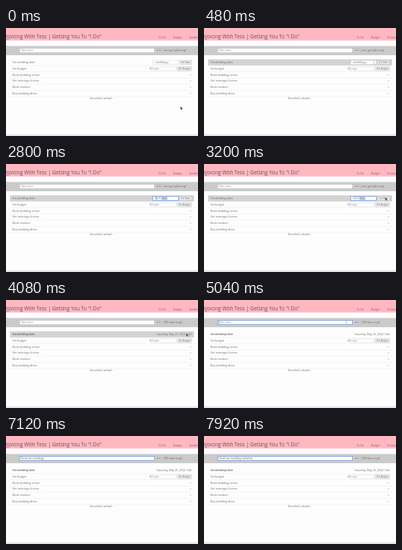
An HTML page for the animation above (8 s loop, 240 by 135 pixels).

```html
<!DOCTYPE html>
<html lang="en">
<head>
<meta charset="utf-8">
<title>Wedding planner</title>
<style>
html, body { margin: 0; width: 100%; height: 100%; overflow: hidden; background: #fff; }
svg { display: block; width: 100vw; height: 100vh; }
text { font: 3.5px "Open Sans", "Noto Sans", sans-serif; fill: #737373; white-space: pre; }
.title { font-size: 6.4px; fill: #6b5559; }
.nav { font-size: 3.3px; fill: #7d6368; }
.field { fill: #fdfdfd; stroke: #bdbdbd; stroke-width: .25; }
.field.on { stroke: #7d9fdc; stroke-width: .7; }
.button { fill: #ececec; stroke: #a8a8a8; stroke-width: .3; }
.bar .button { fill: #d6d6d6; }
.small { font-size: 2.9px; }
.medium { font-size: 3.35px; }
.entry { font-family: Lato, "Open Sans", sans-serif; font-size: 3.45px; }
.hint { fill: #a0a0a0; }
.done { text-decoration: line-through; fill: #666; }
.rule { stroke: #e9e9e9; stroke-width: .4; }
.chevron { fill: none; stroke: #777; stroke-width: .45; }
</style>
</head>
<body>
<svg viewBox="0 0 240 135" preserveAspectRatio="none">
  <defs>
    <linearGradient id="shade" x2="0" y2="1">
      <stop stop-color="#fdfdfd"/>
      <stop offset="1" stop-color="#dedede"/>
    </linearGradient>
  </defs>
  <rect width="240" height="135" fill="#fdfdfd"/>
  <rect width="240" height="15.6" fill="#ffb8c1"/>
  <text class="title" x="119.5" y="12.6" text-anchor="end">Rejoicing With Tess | Getting You To "I Do"</text>
  <text class="nav" x="191" y="13.2">To Do</text>
  <text class="nav" x="209" y="13.2">Budget</text>
  <text class="nav" x="229" y="13.2">Vendors</text>

  <g class="bar">
    <rect y="22.5" width="240" height="11.5" fill="#cacaca"/>
    <rect id="item" class="field" x="17.3" y="25.6" width="168" height="5"/>
    <text id="itemText" class="entry" x="19" y="29.3"></text>
    <path id="caret" stroke="#555" stroke-width=".3"/>
    <rect class="button" x="186.5" y="25.6" width="9" height="5"/>
    <text class="small" x="191" y="29.1" text-anchor="middle">Add</text>
    <text id="status" class="medium" x="197" y="29.3"></text>
  </g>

  <rect id="hover" x="5" width="230" height="7.7" fill="#d3d3d3"/>
  <g id="rows"></g>

  <g id="dateForm">
    <rect id="date" class="field" x="183.5" y="40.7" width="32" height="4.8"/>
    <text id="dateText" class="small" x="186" y="44.2"></text>
    <rect id="part" y="41.4" height="3.5" fill="#3c78e0" opacity=".35"/>
    <rect class="button" x="217" y="40.7" width="15" height="4.8"/>
    <text class="small" x="224.5" y="44.1" text-anchor="middle">Set Date</text>
  </g>
  <text id="dateDone" class="medium" x="232" y="44.2" text-anchor="end">Saturday, May 25, 2024  Edit</text>

  <text x="179.2" y="52">$</text>
  <rect class="field" x="181.2" y="48.4" width="31.5" height="4.8"/>
  <text class="small hint" x="182" y="51.9">Budget</text>
  <rect class="button" x="214" y="48.4" width="18" height="4.8"/>
  <text class="small" x="223" y="51.8" text-anchor="middle">Set Budget</text>

  <text class="medium" x="119.5" y="89" text-anchor="middle">See what's ahead...</text>
  <rect y="131.5" width="240" height="3.5" fill="url(#shade)"/>
  <g id="pointer">
    <path id="arrow" d="M0 0V4.1L1 3.2L1.7 4.7L2.5 4.3L1.8 2.9H3.1Z" fill="#222" stroke="#fff" stroke-width=".3"/>
    <path id="beam" d="M-.5 -1.7H.5M0 -1.7V1.7M-.5 1.7H.5" fill="none" stroke="#555" stroke-width=".3"/>
  </g>
</svg>
<script>
const $ = id => document.getElementById(id);
const LOOP = 8000, STEP = 80, TOP = 39.2, ROW = 7.75;
const SET_AT = 3520, FOCUS_AT = 4880, BLUR_AT = 3440;
const labels = ['Set wedding date', 'Set budget', 'Book wedding venue',
  'Get marriage license', 'Book vendors', 'Buy wedding dress'];

$('rows').innerHTML = labels.map((label, i) => {
  const y = TOP + i * ROW;
  const chevron = i > 1 ? `<path class="chevron" d="M229.7 ${y + 3.4}l.9 .9l.9 -.9"/>` : '';
  return `<path class="rule" d="M5 ${y + ROW}H235"/><text x="8" y="${y + 5}">${label}</text>${chevron}`;
}).join('');
const firstLabel = $('rows').querySelector('text');

// time, x, y
const path = [[0, 218, 98], [80, 218, 97], [440, 213, 44], [880, 207, 43],
  [1040, 207, 43], [1600, 188, 43], [2880, 188, 43], [3200, 226.5, 41.5],
  [3600, 227, 42], [4000, 227, 42], [4720, 178, 28]];
// time, characters typed
const typing = [[5280, 0], [6240, 8], [6400, 8], [7920, 26]];
const phrase = 'Send out wedding invitatio';
// time, date shown, selected part
const dates = [[0, 'mm/dd/yyyy', -1], [1680, 'mm/dd/yyyy', 0], [1920, '05/dd/yyyy', 0],
  [2080, '05/dd/yyyy', 1], [2240, '05/02/yyyy', 1], [2400, '05/25/yyyy', 2],
  [2560, '05/25/0002', 2], [2640, '05/25/0020', 2], [2720, '05/25/0202', 2],
  [2800, '05/25/2024', 2]];

function along(keys, t, ease = p => p) {
  const i = keys.findIndex(k => k[0] > t);
  if (i < 0) return keys.at(-1).slice(1);
  if (!i) return keys[0].slice(1);
  const a = keys[i - 1], b = keys[i];
  const p = ease((t - a[0]) / (b[0] - a[0]));
  return a.slice(1).map((v, j) => v + (b[j + 1] - v) * p);
}

const smooth = p => p * p * (3 - 2 * p);
const show = (id, on) => $(id).style.display = on ? '' : 'none';

function render(t) {
  const [x, y] = along(path, t, smooth);
  const isSet = t >= SET_AT, focused = t >= FOCUS_AT;
  const count = Math.floor(along(typing, t)[0] + .001);

  const row = Math.floor((y - TOP) / ROW);
  show('hover', row >= 0 && row < labels.length);
  $('hover').setAttribute('y', TOP + row * ROW);

  const inDate = !isSet && row === 0 && x > 183 && x < 216;
  const inItem = y < 31 && x < 185;
  show('arrow', !(inDate || inItem));
  show('beam', inDate || inItem && !count);
  $('pointer').setAttribute('transform', `translate(${x} ${y})`);

  show('dateForm', !isSet);
  show('dateDone', isSet);
  firstLabel.classList.toggle('done', isSet);
  $('status').textContent = isSet ? '306 days to go!' : "Let's get planning!";

  const [, date, part] = dates.findLast(d => d[0] <= t);
  const text = $('dateText');
  const picking = part >= 0 && t < BLUR_AT;
  text.textContent = date;
  $('date').classList.toggle('on', picking);
  show('part', picking);
  if (picking) {
    const from = part * 3, to = part === 2 ? 9 : from + 1;
    const left = text.getStartPositionOfChar(from).x;
    $('part').setAttribute('x', left - .2);
    $('part').setAttribute('width', text.getEndPositionOfChar(to).x - left + .4);
  }

  const item = $('itemText');
  item.textContent = count ? phrase.slice(0, count) : 'New item';
  item.classList.toggle('hint', !count);
  $('item').classList.toggle('on', focused);
  show('caret', focused);
  const end = count ? item.getEndPositionOfChar(count - 1).x + .3 : 18.7;
  $('caret').setAttribute('d', `M${end} 26.4V29.9`);
}

function tick(now) {
  render(Math.floor(now % LOOP / STEP) * STEP);
  requestAnimationFrame(tick);
}
render(0);
requestAnimationFrame(tick);
</script>
</body>
</html>
```
